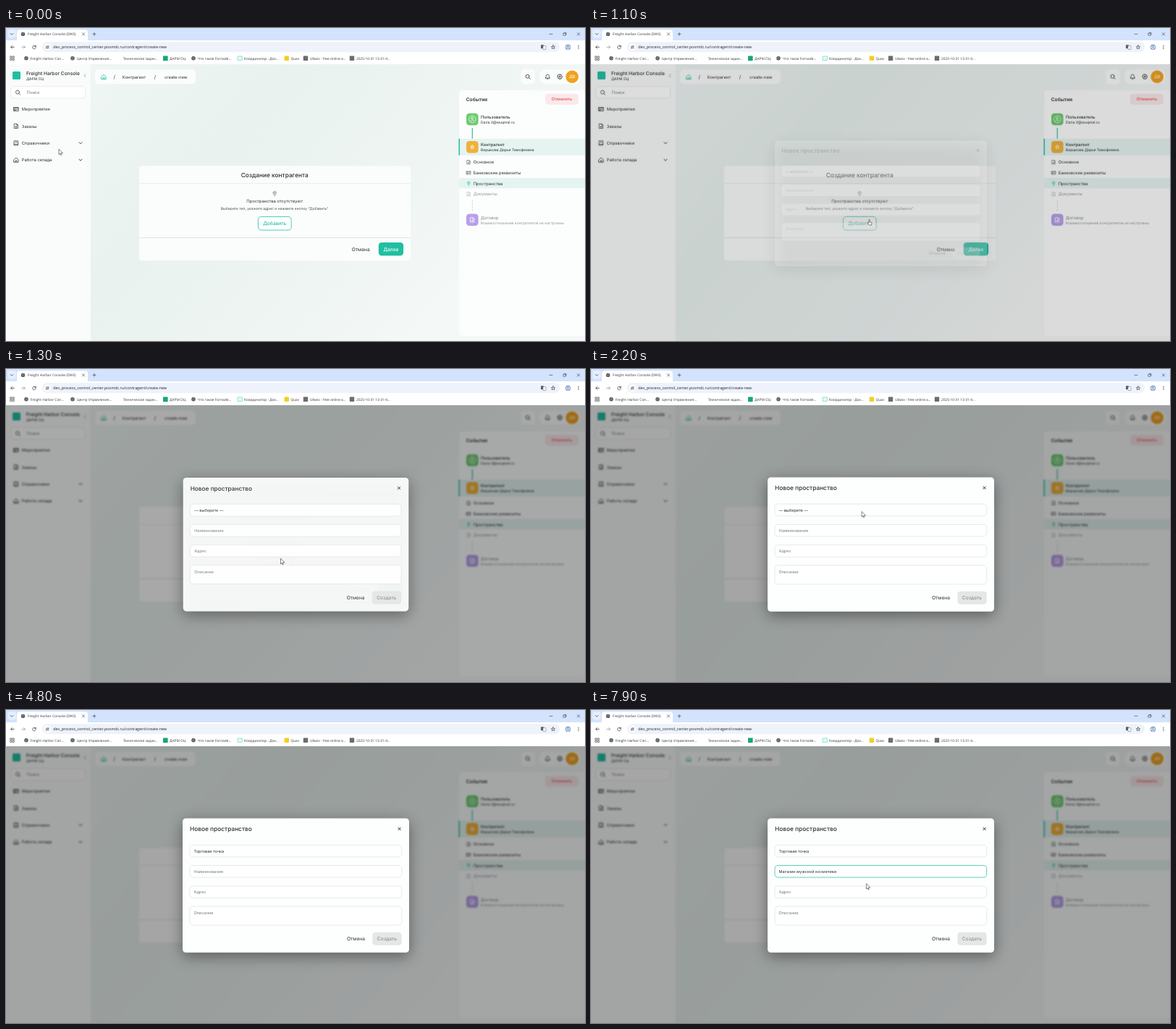
An HTML page with a canvas for the animation above (8 s loop, 800x432 px).

```html
<!DOCTYPE html>
<html lang="ru">
<head>
<meta charset="utf-8">
<title>Новое пространство</title>
<style>
  html, body { margin: 0; width: 100%; height: 100%; overflow: hidden; background: #fff; }
  canvas { display: block; width: 800px; height: 432px; }
</style>
</head>
<body>
<canvas id="stage"></canvas>
<script>
const W = 800, H = 432, TOP = 50, LOOP = 8000;
const SCALE = window.devicePixelRatio || 1;
const UI = 'Inter, "Noto Sans", sans-serif';
const SYS = '"Open Sans", "Noto Sans", sans-serif';
const TEAL = '#21bfa2', INK = '#2b2f32', GREY = '#92989b', LINE = '#dde1e2';

const stage = document.getElementById('stage');
let c;

function layer(canvas) {
  canvas.width = W * SCALE;
  canvas.height = H * SCALE;
  const ctx = canvas.getContext('2d');
  ctx.scale(SCALE, SCALE);
  ctx.textRendering = 'geometricPrecision';
  return ctx;
}

const clamp = v => Math.max(0, Math.min(1, v));
const ease = v => { v = clamp(v); return v * v * (3 - 2 * v); };
const mix = (a, b, k) => a + (b - a) * k;

// y is the middle of the capital letters
function text(s, x, y, size, color = INK, weight = 400, font = UI, align = 'left') {
  c.font = `${weight} ${size}px ${font}`;
  c.textAlign = align;
  c.fillStyle = color;
  c.fillText(s, x, y + size * 0.36);
}
const mid = (s, x, y, size, color, weight) => text(s, x, y, size, color, weight, UI, 'center');
const sys = (s, x, y, size = 4.8, color = '#33373b') => text(s, x, y, size, color, 400, SYS);

function box(x, y, w, h, r, fill, stroke, lw = 0.6) {
  c.beginPath();
  c.roundRect(x, y, w, h, r);
  if (fill) { c.fillStyle = fill; c.fill(); }
  if (stroke) { c.strokeStyle = stroke; c.lineWidth = lw; c.stroke(); }
}

function dot(x, y, r, fill, stroke, lw = 0.7) {
  c.beginPath();
  c.arc(x, y, r, 0, Math.PI * 2);
  if (fill) { c.fillStyle = fill; c.fill(); }
  if (stroke) { c.strokeStyle = stroke; c.lineWidth = lw; c.stroke(); }
}

// icon paths are drawn around their own centre
function icon(d, x, y, color = INK, lw = 0.7, fill) {
  c.save();
  c.translate(x, y);
  c.lineCap = c.lineJoin = 'round';
  const p = new Path2D(d);
  if (fill) { c.fillStyle = fill; c.fill(p); }
  c.strokeStyle = color;
  c.lineWidth = lw;
  c.stroke(p);
  c.restore();
}

const ICON = {
  down: 'M-2-1L0 1L2-1',
  left: 'M1-2L-1 0L1 2',
  back: 'M2.3 0H-2.3M-.3-2L-2.3 0L-.3 2',
  fwd: 'M-2.3 0H2.3M.3-2L2.3 0L.3 2',
  cross: 'M-1.7-1.7L1.7 1.7M1.7-1.7L-1.7 1.7',
  plus: 'M-2 0H2M0-2V2',
  reload: 'M1.8-1.3A2.3 2.3 0 1 0 2.3.3M2.3-2.4V-.9H.8',
  house: 'M-3.2-.3L0-3.2L3.2-.3V3H-3.2ZM-1.1 3V.7H1.1V3',
  card: 'M-3.2-2.5H3.2V2.5H-3.2ZM-3.2-1.2H3.2M.6.6H2M-2 .3H-.8V1.4H-2Z',
  doc: 'M-2.4-3.1H.8L2.5-1.4V3.1H-2.4ZM.8-3.1V-1.4H2.5M-1.1 1H1.1M0-.1V2.1',
  book: 'M-2.6-3H2.6V3H-2.6ZM-2.6 1.5H2.6M-1-1.3H1',
  pin: 'M0 3C-3.2-.1-2.6-3 0-3S3.2-.1 0 3ZM-.8-.7A.8.8 0 1 1 .8-.7A.8.8 0 1 1-.8-.7',
  search: 'M1.5 1.5L3.2 3.2M2.1-.4A2.5 2.5 0 1 1-2.9-.4A2.5 2.5 0 1 1 2.1-.4',
  bell: 'M-3 1.7C-2 .8-2.2-.8-2-1.5C-1.4-3.6 1.4-3.6 2-1.5C2.2-.8 2 .8 3 1.7ZM-.8 3H.8',
  gear: 'M-1.6-3H1.6L3.3 0L1.6 3H-1.6L-3.3 0ZM-1.1 0A1.1 1.1 0 1 1 1.1 0A1.1 1.1 0 1 1-1.1 0',
  star: 'M0-2.7L.8-.8L2.7-.7L1.2.5L1.7 2.4L0 1.3L-1.7 2.4L-1.2.5L-2.7-.7L-.8-.8Z',
  person: 'M-1.3-1.3A1.3 1.3 0 1 1 1.3-1.3A1.3 1.3 0 1 1-1.3-1.3M-2.4 2.5C-2.2.5 2.2.5 2.4 2.5',
  arrow: 'M0 0V7.1L1.6 5.6L2.7 8.1L3.8 7.6L2.7 5.2H5Z',
  beam: 'M-1.2-3H1.2M0-3V3M-1.2 3H1.2',
  hand: 'M0 0V4L-1.2 3.2L-1.7 4L.4 7H3.5L4 3.6L1.2 2.8V0Z'
};

function globe(x, y) {
  dot(x, y, 2.7, '#43474b');
  icon('M-2 -.7L-.5 0L-.2 1.7M.4-2L.3-.7L1.9.5', x, y, '#d9dcdf', 0.6);
}

function browser() {
  box(0, 0, W, TOP, 0, '#fff');
  box(0, 0, W, 17, 0, '#d3e3fd');
  box(2.5, 2.5, 11, 11, 3, '#e6effd');
  icon(ICON.down, 8, 8.4);
  box(15, 2.5, 98, 18, 4, '#fff');
  box(0, 17, W, 17, 0, '#fff');
  globe(23.5, 8.4);
  sys('Freight Harbor Console (DWS)', 30, 8.4);
  icon(ICON.cross, 107, 8.4, INK, 0.6);
  icon(ICON.plus, 122, 8.4, INK, 0.6);
  icon('M-2 0H2', 753, 8.4, INK, 0.6);
  icon('M-1.8-1.2H1.2V1.8H-1.8ZM-.8-1.2V-2H2V.8H1.2', 772, 8.4, INK, 0.5);
  icon(ICON.cross, 791, 8.4, INK, 0.6);

  icon(ICON.back, 9, 26.4);
  icon(ICON.fwd, 24, 26.4, '#8d9195');
  icon(ICON.reload, 39, 26.4);
  box(50, 19.3, 715, 14, 7, '#eef2fa');
  dot(57.2, 26.4, 4.8, '#fff');
  icon('M-2-1.1H.3M1.5-1.1H2M-2 1.1H-1.5M-.3 1.1H2', 57.2, 26.4);
  dot(58.2, 25.3, 0.7, null, INK, 0.5);
  dot(56.2, 27.5, 0.7, null, INK, 0.5);
  sys('dev_process_control_center.posmdc.ru/contragent/create-new', 65.3, 26.4, 5.4, '#202327');
  box(739, 23.2, 4, 5, 0.6, '#5b6167');
  box(742, 24.6, 4, 5, 0.6, '#fff', '#5b6167', 0.5);
  icon(ICON.star, 756, 26.4, INK, 0.6);
  dot(776.5, 26.4, 3.4, '#e3ecfb', '#3c68ae', 0.6);
  icon(ICON.person, 776.5, 26.4, '#3c68ae', 0.6);
  for (const d of [-2, 0, 2]) dot(791, 26.4 + d, 0.55, INK);

  const y = 41.8;
  for (const i of [0, 1, 2, 3]) box(5.7 + i % 2 * 3.3, y - 2.9 + (i >> 1) * 3.3, 2.3, 2.3, 0.2, null, INK, 0.6);
  globe(28, y);
  sys('Freight Harbor Con...', 33.4, y);
  globe(92, y);
  sys('Центр Управления...', 98, y);
  sys('Техническое задан...', 161.7, y);
  box(217, y - 3.2, 6.6, 6.6, 0.5, '#16a779');
  sys('ДАРМ ОЦ', 226.3, y);
  globe(259, y);
  sys('Что такое Fornade...', 265, y);
  box(320, y - 2.8, 6.4, 5.6, 0.6, '#e4faf5', '#4fd0c6');
  sys('Координатор - Док...', 329, y);
  box(384.6, y - 3.2, 6.4, 6.4, 1, '#f3cf22');
  sys('Quav', 393.4, y);
  for (const x of [414, 478]) box(x - 3.2, y - 3.2, 6.4, 6.4, 0.4, '#6a6d70');
  sys('Ubwix - free online a...', 420, y);
  sys('2025-10-31 13-31-4...', 484, y);
}

function sidebar() {
  box(0, TOP, 117, H - TOP, 0, '#fafbfb');
  box(9, 60, 11, 11, 1.5, TEAL);
  text('Freight Harbor Console', 28, 62.8, 6.67, INK, 500);
  text('ДАРМ ОЦ', 28, 70.2, 5);
  icon(ICON.left, 109, 65.8, TEAL);
  box(6.6, 80.7, 103, 16.2, 4.2, '#fff', LINE);
  icon(ICON.search, 16.4, 89);
  text('Поиск', 28.6, 89.4, 5.83, '#6f7578');
  const items = [['Мероприятия', 'card'], ['Заказы', 'doc'], ['Справочники', 'book'], ['Работа склада', 'house']];
  items.forEach(([label, name], i) => {
    const y = 112 + i * 23.4;
    icon(ICON[name], 14, y);
    text(label, 21.8, y + 0.2, 5.83);
    if (i > 1) icon(ICON.down, 103, y, INK, 0.9);
  });
}

function backdrop() {
  const g = c.createLinearGradient(117, TOP, 560, H);
  g.addColorStop(0, '#eff6f4');
  g.addColorStop(0.35, '#e9f2ef');
  g.addColorStop(0.65, '#edf4f2');
  g.addColorStop(1, '#f4f8f7');
  box(117, TOP, W - 117, H - TOP, 0, g);
}

function header() {
  box(123, 57.2, 139, 20, 5, '#fbfdfc');
  icon(ICON.house, 135, 67.6, TEAL, 0.8);
  text('/', 148.6, 67.4, 6.67);
  text('Контрагент', 160.8, 67.6, 5.83);
  text('/', 204.8, 67.4, 6.67);
  text('create-new', 219, 67.6, 5.83);
  box(711.5, 57.2, 19.5, 20, 5, '#fbfdfc');
  icon(ICON.search, 721, 67.2, INK, 0.8);
  box(737, 57.2, 57, 20, 8, '#fbfdfc');
  icon(ICON.bell, 748.3, 67.2, INK, 0.8);
  icon(ICON.gear, 765.3, 67.2, INK, 0.9);
  dot(782.2, 67.3, 8.8, '#f0a21f');
  mid('ДВ', 782.2, 67.4, 5.83, '#fff');
}

function badge(y, color, name) {
  box(636, y - 8.3, 16.6, 16.6, 4.2, color);
  if (name === 'person') dot(644.3, y, 4.7, null, '#fff', 0.7);
  icon(ICON[name], 644.3, y, '#fff', 0.8);
}

function events() {
  box(626, 86, 180, 339, 5, '#fcfdfd');
  text('События', 635.7, 98.2, 6.67, INK, 600);
  box(745, 90.8, 46, 15, 4.2, '#f9e9eb');
  mid('Отменить', 768, 98.3, 5.83, '#ec4f56', 500);

  badge(126, '#6dcb70', 'person');
  text('Пользователь', 656, 122.8, 5.83, INK, 500);
  text('Daria.V@wuqmel.ru', 656, 130.2, 5);
  box(643.7, 138, 1.3, 15, 0, '#47bda8');

  box(625.5, 152.8, 175, 23, 0, '#e5f4f1');
  box(625.5, 152.8, 1.5, 23, 0, TEAL);
  badge(164.3, '#f0b13a', 'star');
  text('Контрагент', 656, 161, 5.83, INK, 500);
  text('Вершкова Дарья Тимофеевна', 656, 168.6, 5);

  box(626, 207, 174, 14.3, 0, '#e5f4f1');
  const steps = [['Основное', 'doc', INK], ['Банковские реквизиты', 'card', INK],
    ['Пространства', 'pin', INK], ['Документы', 'doc', GREY]];
  steps.forEach(([label, name, color], i) => {
    const y = 185.2 + i * 14.65;
    c.save();
    c.translate(639.2, y);
    c.scale(0.85, 0.85);
    icon(ICON[name], 0, 0, name === 'pin' ? TEAL : i === 3 ? '#b1b6b8' : '#555b5e');
    c.restore();
    text(label, 645.7, y, 5.83, color);
  });
  for (let y = 238; y < 251; y += 4) box(643.9, y, 0.8, 2.3, 0, '#c2c6c8');
  badge(264.8, '#b7a0ea', 'doc');
  text('Договор', 656, 262, 5.83, '#7d8386');
  text('Взаимоотношения контрагентов не настроены', 656, 269.2, 5, GREY);
}

function card() {
  box(184, 190.3, 375, 130.7, 4, '#fbfdfc');
  box(184, 214.2, 375, 0.7, 0, '#e6eae9');
  box(184, 289.3, 375, 0.7, 0, '#d9dedd');
  mid('Создание контрагента', 371.2, 202.6, 8.33, INK, 500);
  icon(ICON.pin, 371.2, 228.4, '#6b7073');
  mid('Пространства отсутствуют', 371.2, 239.3, 5.83);
  mid('Выберите тип, укажите адрес и нажмите кнопку "Добавить"', 371.2, 249, 5, '#4b5053');
  box(348.4, 260.4, 45.8, 18.6, 4.2, '#fff', TEAL, 0.8);
  mid('Добавить', 371.3, 269.7, 6.67, TEAL, 500);
  mid('Отмена', 490.3, 305.3, 6.67);
  box(514.8, 296, 34.3, 18.3, 4.2, TEAL);
  mid('Далее', 532, 305.3, 6.67, '#fff', 500);
}

function page() {
  backdrop();
  sidebar();
  header();
  events();
  card();
}

const NAME = 'Магазин мужской косметики';
const typed = t => NAME.slice(0, Math.round(NAME.length * clamp((t - 6700) / 700)));

function field(y, h, hint, value, focus) {
  box(254, y, 292.7, h, 4.2, '#fff', focus ? '#48cbae' : LINE, focus ? 0.9 : 0.7);
  const baseline = h > 20 ? y + 8.8 : y + h / 2 + 0.1;
  text(value || hint, 259.6, baseline, 5.55, value ? INK : '#777d80');
}

function modal(t) {
  c.save();
  c.shadowColor = 'rgba(0,0,0,.42)';
  c.shadowBlur = 20 * SCALE;
  c.shadowOffsetY = 5 * SCALE;
  box(244, 149.5, 313, 185.3, 4.6, '#fdfefe');
  c.restore();
  text('Новое пространство', 254, 164.3, 8.33, INK, 500);
  icon(ICON.cross, 543.6, 164, INK, 1);

  const name = typed(t), focus = t >= 6200;
  field(186.3, 16.5, '', t >= 3100 ? 'Торговая точка' : '— выберите —');
  field(214.5, 16.5, 'Наименование', name, focus);
  field(242.8, 16.5, 'Адрес');
  field(271, 26, 'Описание');
  if (focus && (t - 6200) % 1000 < 600 || t >= 6800 && t <= 7500) {
    c.font = `400 5.55px ${UI}`;
    box(259.6 + c.measureText(name).width, 219.3, 0.7, 7, 0, '#111');
  }
  mid('Отмена', 483.5, 315.9, 6.67);
  box(506.3, 306.8, 40.4, 18, 4.2, '#e5e6e6');
  mid('Создать', 526.4, 315.9, 6.67, '#8d9092', 500);
}

// time, x, y
const PATH = [
  [0, 73, 167.5], [100, 75, 168], [900, 384, 265], [1100, 384, 265], [1300, 379.5, 262],
  [1500, 379, 258], [1900, 374, 197], [2900, 374, 197], [3300, 376, 240],
  [5300, 366, 231], [5800, 366, 210], [6000, 363.2, 223], [7500, 363.2, 223], [7900, 380.4, 240]
];

function cursor(t) {
  if (t >= 3400 && t < 5300 || t >= 6800 && t < 7600) return;
  const n = PATH.findIndex(p => p[0] >= t);
  const b = PATH[n], a = PATH[Math.max(0, n - 1)];
  const k = b === a ? 0 : ease((t - a[0]) / (b[0] - a[0]));
  const x = mix(a[1], b[1], k), y = mix(a[2], b[2], k);
  if (t >= 6000 && t < 7700) icon(ICON.beam, x, y, '#222', 0.8);
  else icon(t >= 900 && t < 1200 ? ICON.hand : ICON.arrow, x, y, '#333', 0.6, '#fff');
}

const sharp = document.createElement('canvas');
c = layer(sharp);
page();

const soft = document.createElement('canvas');
c = layer(soft);
c.filter = `blur(${1.15 * SCALE}px)`;
c.drawImage(sharp, 0, 0, W, H);

const view = layer(stage);

function draw(t) {
  c = view;
  const open = ease((t - 1000) / 350);
  c.globalAlpha = 1;
  c.drawImage(sharp, 0, 0, W, H);
  if (open) {
    c.globalAlpha = open;
    c.drawImage(soft, 0, 0, W, H);
    c.globalAlpha = 1;
    box(0, TOP, W, H - TOP, 0, `rgba(0,0,0,${0.35 * Math.pow(open, 0.6)})`);
    c.save();
    c.globalAlpha = open;
    const s = mix(0.92, 1, open);
    c.translate(400.5, 242);
    c.scale(s, s);
    c.translate(-400.5, -242);
    modal(t);
    c.restore();
  }
  browser();
  cursor(t);
}

const start = performance.now();
function tick() {
  const t = (performance.now() - start) % LOOP;
  draw(Math.floor(t / 100) * 100);
  requestAnimationFrame(tick);
}
tick();
</script>
</body>
</html>
```
